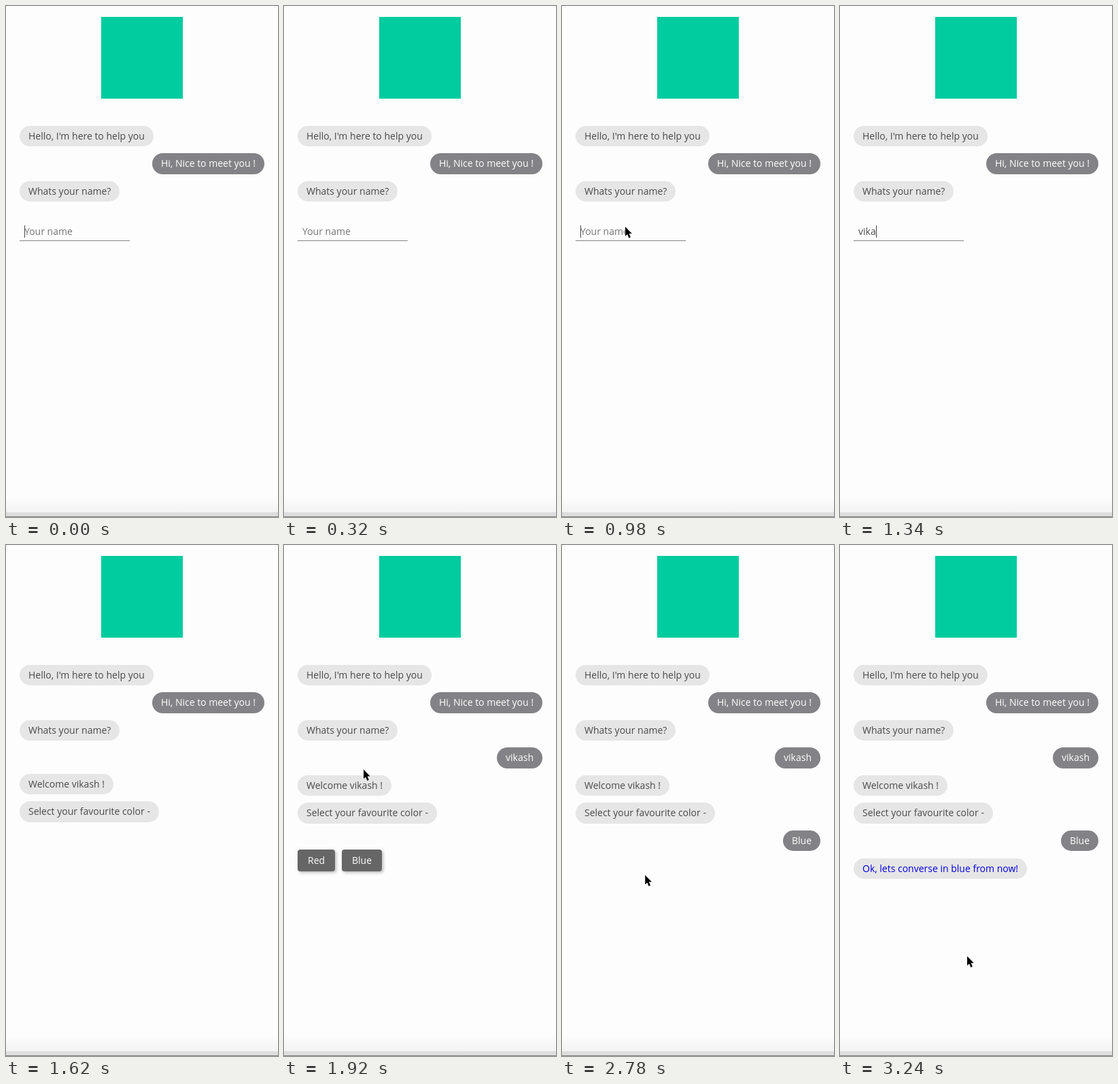
Recreate the animation shown at these times as an HTML page. Size 400x750 px, loop 3260 ms.

```html
<!DOCTYPE html>
<html lang="en">
<head>
<meta charset="utf-8">
<title>Chat</title>
<style>
html, body { margin: 0; width: 100%; height: 100%; overflow: hidden; }
body { position: relative; background: #fdfdfd; font: 14px "Open Sans", "Noto Sans", sans-serif; color: #4a4a4a; }
body > * { position: absolute; white-space: pre; }
#logo { left: 140px; top: 16px; width: 120px; height: 120px; background: #00cc9f; }
.bubble { left: 20px; padding: 0 13px; height: 30.5px; line-height: 30.5px; border-radius: 16px; background: #e6e6e6; }
.user { left: auto; right: 20px; background: #838387; color: #fff; }
#field { left: 20px; top: 316px; width: 155px; height: 28px; padding-left: 7px; line-height: 29px; border-bottom: 1px solid #858585; }
#field.empty { color: #757575; }
#caret { display: inline-block; width: 1px; height: 18px; margin-right: -1px; background: #444; vertical-align: -4px; }
.button { top: 447px; height: 32px; line-height: 32px; padding: 0 15px; border-radius: 4px; background: #666; color: #fff; box-shadow: 2px 2px 4px #bbb; }
#tip { left: 100.5px; top: 291px; height: 17.5px; padding: 0 6.5px; font: 500 11px/17.5px Inter, sans-serif; background: #747474; color: #fff; box-shadow: 0 1px 4px #ccc; }
#cursor { left: 0; top: 0; overflow: visible; }
#edge { left: 0; right: 0; top: 720px; height: 30px; background: linear-gradient(#fdfdfd, #f3f3f3 23px, #dedede 23px 29px, #808080 29px); }
</style>
</head>
<body>
<div id="logo"></div>
<div id="edge"></div>
<div id="field"><span id="before"></span><span id="caret"></span><span id="after"></span></div>
<div class="button" style="left:20px">Red</div>
<div class="button" style="left:85px">Blue</div>
<div id="tip">Reload this page, hold to see more options</div>
<svg id="cursor" width="12" height="18"><path d="M0 0V13.8L3.1 11L5.4 16.4L7.9 15.3L5.6 10.1H9.8Z" stroke="#fff" stroke-width="1.4" paint-order="stroke"/></svg>
<script>
const LOOP = 3260, NAME = 'vikash';
const SUBMIT = 1520, REPLY = 1680, PICK = 2600;
const $ = id => document.getElementById(id);
const clamp = v => Math.max(0, Math.min(1, v));
const show = (el, on) => el.style.visibility = on ? 'visible' : 'hidden';

// text, top, start time, sent by the user
const bubbles = [
  ["Hello, I'm here to help you", 175.5, -100],
  ['Hi, Nice to meet you !', 216, -100, true],
  ['Whats your name?', 256.5, -100],
  [NAME, 297, REPLY, true],
  [`Welcome ${NAME} !`, 337.5, 1540],
  ['Select your favourite color -', 378, 1570],
  ['Blue', 418.5, 2680, true],
  ['Ok, lets converse in blue from now!', 459.5, 2800]
].map(([text, top, start, user]) => {
  const el = document.createElement('div');
  el.className = user ? 'bubble user' : 'bubble';
  el.textContent = text;
  document.body.insertBefore(el, $('tip'));
  return { el, top, start };
});
bubbles[7].el.style.color = '#0000e0';
const buttons = document.querySelectorAll('.button');

// time, x, y of the pointer
const path = [
  [500, 72, -20], [640, 93, 324], [1780, 93, 324], [1920, 117, 329.5],
  [2400, 110, 462], [2660, 110, 462], [3140, 187, 603.5], [LOOP, 187, 603.5]
];
function pointer(t) {
  const i = Math.max(1, path.findIndex(p => p[0] >= t));
  const [t0, x0, y0] = path[i - 1], [t1, x1, y1] = path[i];
  const u = clamp((t - t0) / (t1 - t0)), e = u * u * (3 - 2 * u);
  return [x0 + (x1 - x0) * e, y0 + (y1 - y0) * e];
}

function draw(t) {
  for (const { el, top, start } of bubbles) {
    const lift = top > 330 && t < REPLY ? 2 : 0;
    el.style.top = top - lift + 'px';
    el.style.opacity = clamp((t - start) / 40);
  }
  const typed = NAME.slice(0, Math.max(0, Math.floor((t - 940) / 90)));
  $('before').textContent = typed;
  $('after').textContent = typed ? '' : 'Your name';
  $('field').className = typed ? '' : 'empty';
  show($('field'), t < SUBMIT);
  show($('caret'), t < SUBMIT && (t < 320 || t > 740));
  show($('tip'), t >= 560 && t < 860);
  for (const b of buttons) show(b, t >= 1760 && t < PICK);
  show($('cursor'), t < 1000 || t >= 1780);
  const [x, y] = pointer(t);
  $('cursor').style.transform = `translate(${x}px, ${y}px)`;
}

const begin = performance.now();
function tick() {
  draw((performance.now() - begin) % LOOP);
  requestAnimationFrame(tick);
}
tick();
</script>
</body>
</html>
```
